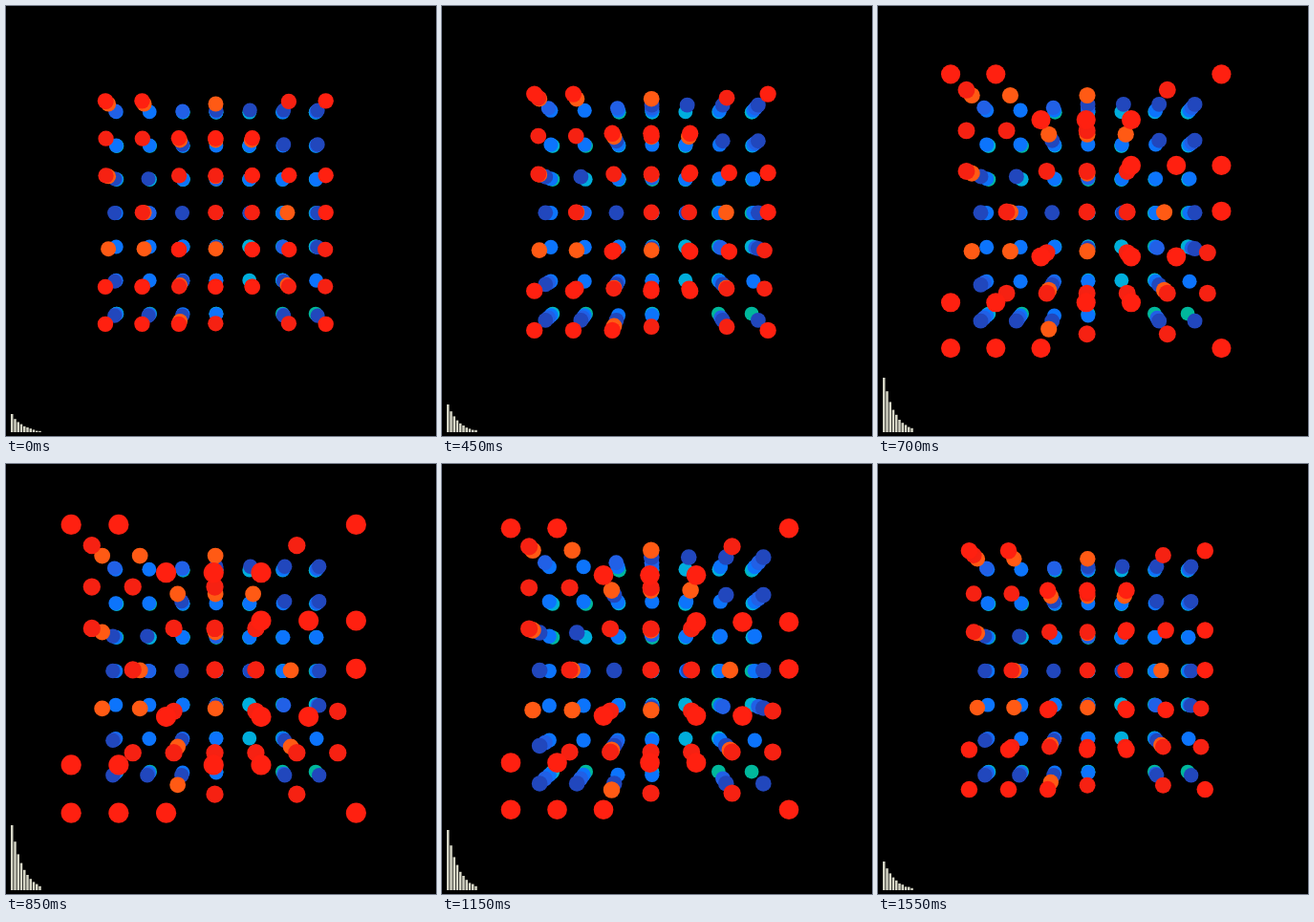
Recreate the animation shown at these times as an HTML page with a canvas. Size 450 px wide and 450 px high, loop 1.6 s.

```html
<!DOCTYPE html>
<html>
<head>
<meta charset="utf-8">
<style>
html, body { margin: 0; width: 100%; height: 100%; overflow: hidden; background: #000; }
canvas { display: block; }
</style>
</head>
<body>
<canvas id="stage" width="450" height="450"></canvas>
<script>
const ctx = document.getElementById('stage').getContext('2d');
const SIZE = 450, LOOP = 1600, STEP = 50, FLAT = 34.7;

// Loudness of the sound over one loop: time, bass, mids.
const envelope = [
  [0, 0.25, 0.09], [300, 0, 0], [550, 0.67, 0.5], [850, 1, 0.16],
  [1150, 0.92, 0.54], [1350, 0.85, 1], [1550, 0.43, 0.16], [LOOP, 0.25, 0.09],
];

// Each band moves forward by a mix of bass and mids; "odds" scatters it over the grid.
const bands = {
  b: { color: '#2147bd', push: (bass, mids) => 8 * mids },
  m: { color: '#2160e6', push: (bass, mids) => 4.7 * mids, odds: 0.35 },
  l: { color: '#0c74fc', push: (bass, mids) => 2.1 * mids, odds: 0.75 },
  c: { color: '#00aedc', push: (bass, mids) => 0.6 * mids, odds: 0.5 },
  t: { color: '#00b89c', push: () => 0, odds: 0.5 },
  o: { color: '#ff5a14', push: (bass, mids) => 8 * (bass * mids) ** 0.28 },
  r: { color: '#f62112', push: bass => 8.2 * bass ** 0.6 },
  R: { color: '#ff2010', push: bass => 15 * bass },
};

// Foreground bands stacked in each grid cell.
const layout = [
  'Rro Ro - ob b rb Rb',
  'r r Rob Rro Ro b b',
  'rob b r ro Rr R R',
  'b ro b r rb o Rb',
  'o o Rr ob Rr R rb',
  'Rb Rr rob Rr Rr rob r',
  'Rb Rb Rob r - rb Rb',
].map(row => row.split(' '));

let seed = 7;
function random() {
  seed = (seed * 16807) % 2147483647;
  return seed / 2147483647;
}

for (const [key, band] of Object.entries(bands)) {
  band.cells = [];
  layout.forEach((row, r) => row.forEach((stack, c) => {
    if (band.odds ? random() < band.odds : stack.includes(key)) {
      band.cells.push([c - 3, r - 3]);
    }
  }));
}

function loudness(t) {
  const i = envelope.findIndex(([time]) => time > t);
  const [t0, bass0, mids0] = envelope[i - 1];
  const [t1, bass1, mids1] = envelope[i];
  const f = (t - t0) / (t1 - t0);
  return [bass0 + (bass1 - bass0) * f, mids0 + (mids1 - mids0) * f];
}

function drawBand({ color, cells, depth }) {
  const gap = FLAT + depth;
  const cx = 220 - depth * 0.18, cy = 216.7 - depth * 0.16;
  ctx.fillStyle = color;
  for (const [x, y] of cells) {
    ctx.beginPath();
    ctx.arc(cx + x * gap, cy + y * gap * 1.012, gap * 0.213, 0, Math.PI * 2);
    ctx.fill();
  }
}

function drawSpectrum(bass) {
  ctx.fillStyle = '#d6d6c6';
  for (let i = 0; i < 10; i++) {
    const h = Math.round(2 + 66 * bass * Math.exp(-0.3 * i)) - i * 0.2;
    ctx.fillRect(5 + i * 3.25, 446 - h, 2.5, h);
  }
}

function draw(t) {
  const [bass, mids] = loudness(t);
  ctx.fillStyle = '#000';
  ctx.fillRect(0, 0, SIZE, SIZE);
  Object.values(bands)
    .map(band => ({ ...band, depth: band.push(bass, mids) }))
    .sort((a, b) => a.depth - b.depth)
    .forEach(drawBand);
  drawSpectrum(bass);
}

let start;
function tick(now) {
  start ??= now;
  draw(Math.floor((now - start) / STEP) * STEP % LOOP);
  requestAnimationFrame(tick);
}
tick(performance.now());
</script>
</body>
</html>
```
